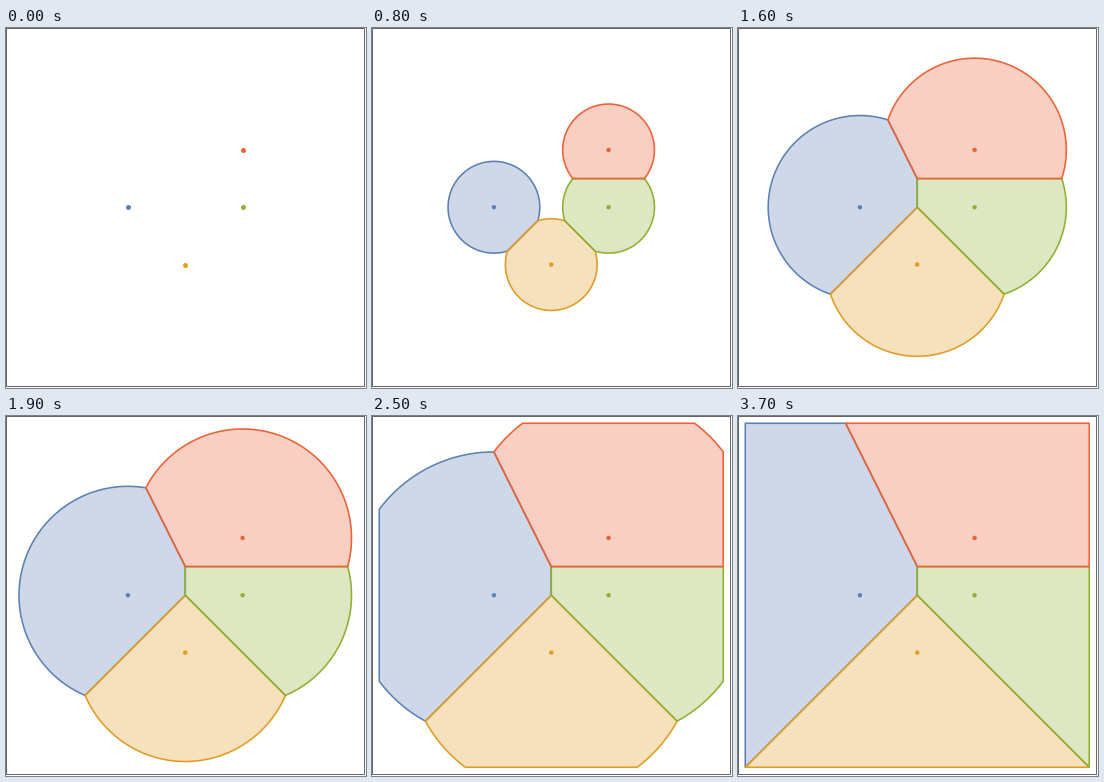
Animation of 360 by 360 pixels, one loop 4100 ms. Source, as a matplotlib script:

```python
import numpy as np
import matplotlib.pyplot as plt
from matplotlib.animation import FuncAnimation
from matplotlib.patches import Circle, Polygon, Rectangle

SIZE, DPI = 360, 72
FRAMES, STEP = 41, 100
UNIT, MID, HALF = 57.33, 179.25, 3

SITES = np.array([(-1, 0), (0, -1), (1, 0), (1, 1)], float)
COLORS = [(0.368, 0.507, 0.710), (0.881, 0.611, 0.142),
          (0.560, 0.692, 0.195), (0.923, 0.386, 0.209)]
WALLS = [(np.array(n, float), HALF) for n in [(1, 0), (-1, 0), (0, 1), (0, -1)]]


def to_px(points):
    return MID + UNIT * np.asarray(points) * (1, -1)


def clip(poly, normal, limit):
    """Keep the part of a convex polygon where normal . p <= limit."""
    out = []
    dist = poly @ normal - limit
    for i in range(len(poly)):
        p, q, a, b = poly[i - 1], poly[i], dist[i - 1], dist[i]
        if (a <= 0) != (b <= 0):
            out.append(p + (q - p) * a / (a - b))
        if b <= 0:
            out.append(q)
    return np.array(out)


def cell(index, radius):
    """Disc around a site, cut by the square and by its bisectors."""
    site = SITES[index]
    angle = np.linspace(0, 2 * np.pi, 360, endpoint=False)
    poly = site + radius * np.column_stack([np.cos(angle), np.sin(angle)])
    cuts = WALLS + [(other - site, (other @ other - site @ site) / 2)
                    for j, other in enumerate(SITES) if j != index]
    for normal, limit in cuts:
        poly = clip(poly, normal, limit)
    return poly


fig = plt.figure(figsize=(SIZE / DPI, SIZE / DPI), dpi=DPI, facecolor="white")
ax = fig.add_axes([0, 0, 1, 1])
ax.set_xlim(0, SIZE)
ax.set_ylim(SIZE, 0)
ax.axis("off")
ax.add_patch(Rectangle((0.5, 0.5), 358, 358, fill=False, ec="#666666", lw=1,
                       snap=False))

cells, dots = [], []
for i, color in enumerate(COLORS):
    shape = Polygon([(0, 0)] * 3, fc=color + (0.3,), ec=color, lw=1.6,
                    joinstyle="round", snap=False, zorder=2 + i)
    dot = Circle((0, 0), 2.2, fc=color, lw=0, zorder=10)
    cells.append(ax.add_patch(shape))
    dots.append(ax.add_patch(dot))


def draw(k):
    growing = k >= 2
    radius = min(k, 37) / 10
    for i, (shape, dot) in enumerate(zip(cells, dots)):
        shape.set_visible(growing)
        center = to_px(SITES[i])
        if growing:
            shape.set_xy(to_px(cell(i, radius)))
        else:
            # resting dots sit on whole pixels
            center = np.floor(center + 0.5) + 0.5
        dot.center = tuple(center)
        dot.set_radius(2.2 if growing else 2.5)
    return cells + dots


anim = FuncAnimation(fig, draw, frames=FRAMES, interval=STEP,
                     init_func=lambda: draw(0), repeat=True, repeat_delay=0)
plt.show()
```
